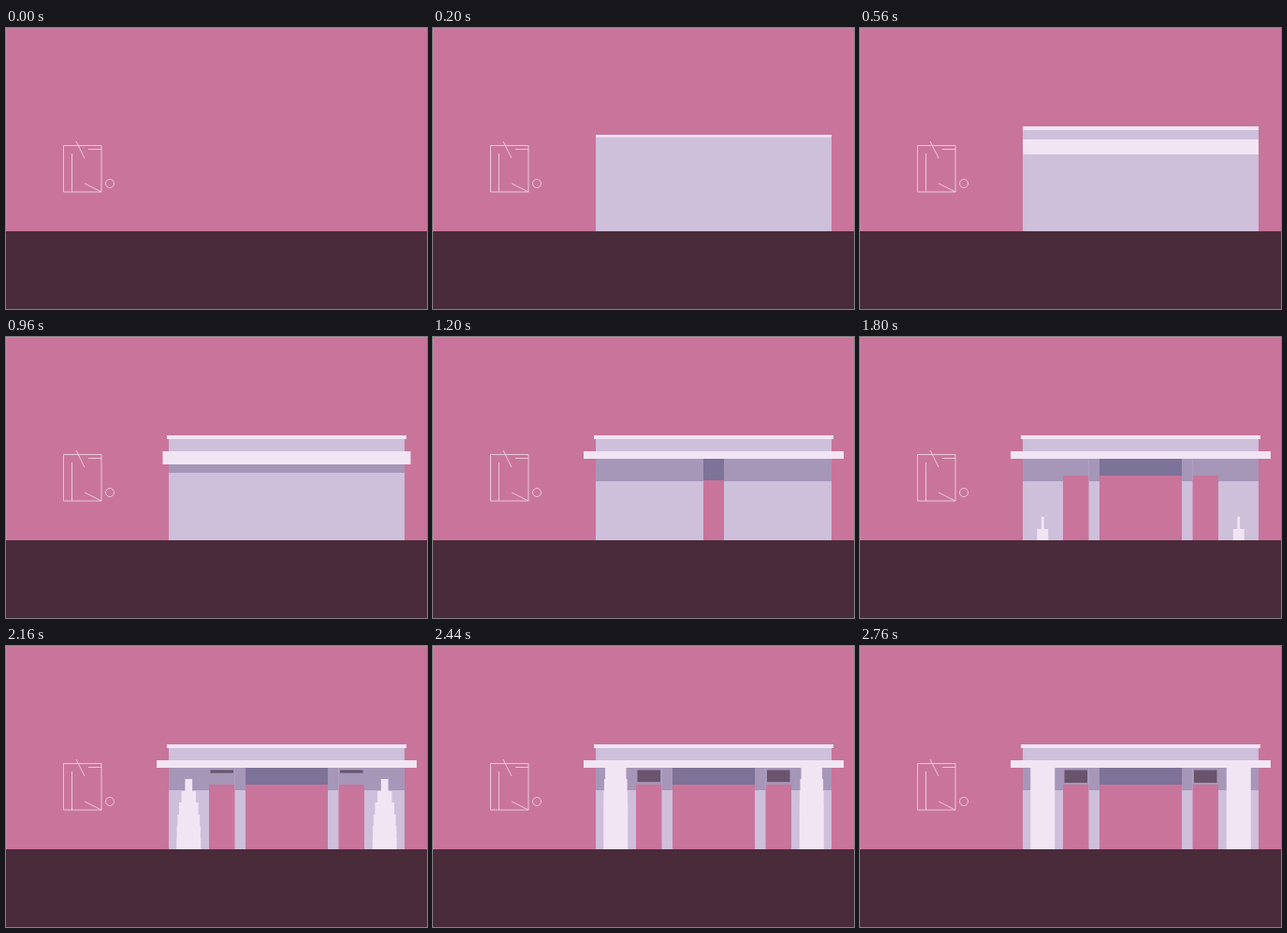
Write an HTML page with a canvas that moves like this. It is 450x300 px and loops after 3.6 s.

```html
<!DOCTYPE html>
<html lang="en">
<head>
<meta charset="utf-8">
<style>
  html, body { margin: 0; width: 100%; height: 100%; overflow: hidden; }
  canvas { display: block; }
</style>
</head>
<body>
<canvas id="stage" width="450" height="300"></canvas>
<script>
const ctx = document.getElementById('stage').getContext('2d');
const LOOP = 3600, STEP = 40, GROUND = 217, MID = 300;
const PINK = '#c9749b', FLOOR = '#4a2b3a', WALL = '#cebfda', LIGHT = '#f1e5f4',
      SHADE = '#a696b8', DARK = '#7d7298', GRILLE = '#69546b';

const progress = (t, start, end) => Math.min(1, Math.max(0, (t - start) / (end - start)));
const easeOut = p => 1 - (1 - p) ** 3;
const easeInOut = p => p * p * (3 - 2 * p);
const backOut = p => 1 + 1.8 * (p - 1) ** 3 + 0.8 * (p - 1) ** 2;
const mix = (a, b, p) => a + (b - a) * p;

function box(x1, y1, x2, y2, color) {
  ctx.fillStyle = color;
  ctx.fillRect(x1, y1, x2 - x1, y2 - y1);
}

// Box given by its offsets from the middle axis, drawn on both sides
function pair(inner, y1, outer, y2, color) {
  box(MID - outer, y1, MID - inner, y2, color);
  box(MID + inner, y1, MID + outer, y2, color);
}

function drawBackground() {
  box(0, 0, 450, GROUND, PINK);
  box(0, 0, 450, 1, '#c487a6');
  box(0, 0, 1, GROUND, '#c487a6');
  box(0, GROUND, 450, 300, FLOOR);
}

function drawSketch() {
  ctx.strokeStyle = '#f3dcea';
  ctx.lineWidth = 0.8;
  ctx.beginPath();
  ctx.rect(61.5, 125.5, 40.5, 49.5);
  for (const [x1, y1, x2, y2] of [[75, 121, 84, 139], [88, 129.5, 102, 129.5],
                                  [70.5, 134, 70.5, 175], [84, 166, 102, 175]]) {
    ctx.moveTo(x1, y1);
    ctx.lineTo(x2, y2);
  }
  ctx.moveTo(115.5, 166);
  ctx.arc(111, 166, 4.5, 0, Math.PI * 2);
  ctx.stroke();
}

function drawWall(t) {
  const slide = Math.round(mix(276, 0, backOut(progress(t, 0, 200))));
  const rise = easeOut(progress(t, 160, 480));
  const top = Math.round(mix(118, 105, rise));
  const capWidth = mix(126, 128, easeOut(progress(t, 580, 760)));
  box(MID - 126 + slide, top, MID + 126 + slide, GROUND, WALL);
  box(MID - capWidth + slide, top, MID + capWidth + slide, top + mix(2, 4, rise), LIGHT);
}

function drawBand(t) {
  const drop = easeOut(progress(t, 480, 680));
  const spread = easeInOut(progress(t, 720, 1200));
  const bottom = mix(mix(109, 142, drop), 130, spread);
  const half = mix(126, 139, spread);
  box(MID - 126, bottom, MID + 126, mix(bottom, 154, spread), SHADE);
  box(MID - half, Math.round(mix(109, 122, drop)), MID + half, bottom, LIGHT);
}

function drawOpening(t) {
  const half = Math.round(83 * easeOut(progress(t, 1180, 1600)));
  const settle = easeOut(progress(t, 1480, 1680));
  const soffit = mix(153, 148, settle);
  ctx.save();
  ctx.beginPath();
  ctx.rect(MID - half, 130, half * 2, GROUND - 130);
  ctx.clip();
  box(MID - half, 130, MID + half, GROUND, PINK);
  box(MID - half, 130, MID + half, soffit, DARK);
  ctx.globalAlpha = progress(t, 1440, 1640);
  pair(55, 130, 83, soffit, SHADE);
  ctx.globalAlpha = 1;
  pair(44, 130, 55.5, mix(153, GROUND, settle), WALL);
  pair(44, 130, 55.5, mix(153, 154, settle), SHADE);
  ctx.restore();
}

function drawGrilles(t) {
  const open = easeInOut(progress(t, 2000, 2520));
  if (open) pair(57, 132.5, 81.5, mix(132.5, 146, open), GRILLE);
}

function drawColumns(t) {
  const tierTop = i => Math.round(GROUND - i * 87 / 7);
  for (let i = 0; i < 7; i++) {
    const half = 13 * easeOut(progress(t, 1700 + 80 * i, 2240 + 80 * i));
    if (half) pair(104.75 - half, tierTop(i + 1), 104.75 + half, tierTop(i), LIGHT);
  }
}

function draw(now) {
  const t = Math.floor(now % LOOP / STEP) * STEP;
  drawBackground();
  drawSketch();
  if (t >= STEP) drawWall(t);
  if (t > 480) drawBand(t);
  if (t > 1180) drawOpening(t);
  drawGrilles(t);
  drawColumns(t);
}

const start = performance.now();
function tick() {
  draw(performance.now() - start);
  requestAnimationFrame(tick);
}
tick();
</script>
</body>
</html>
```
